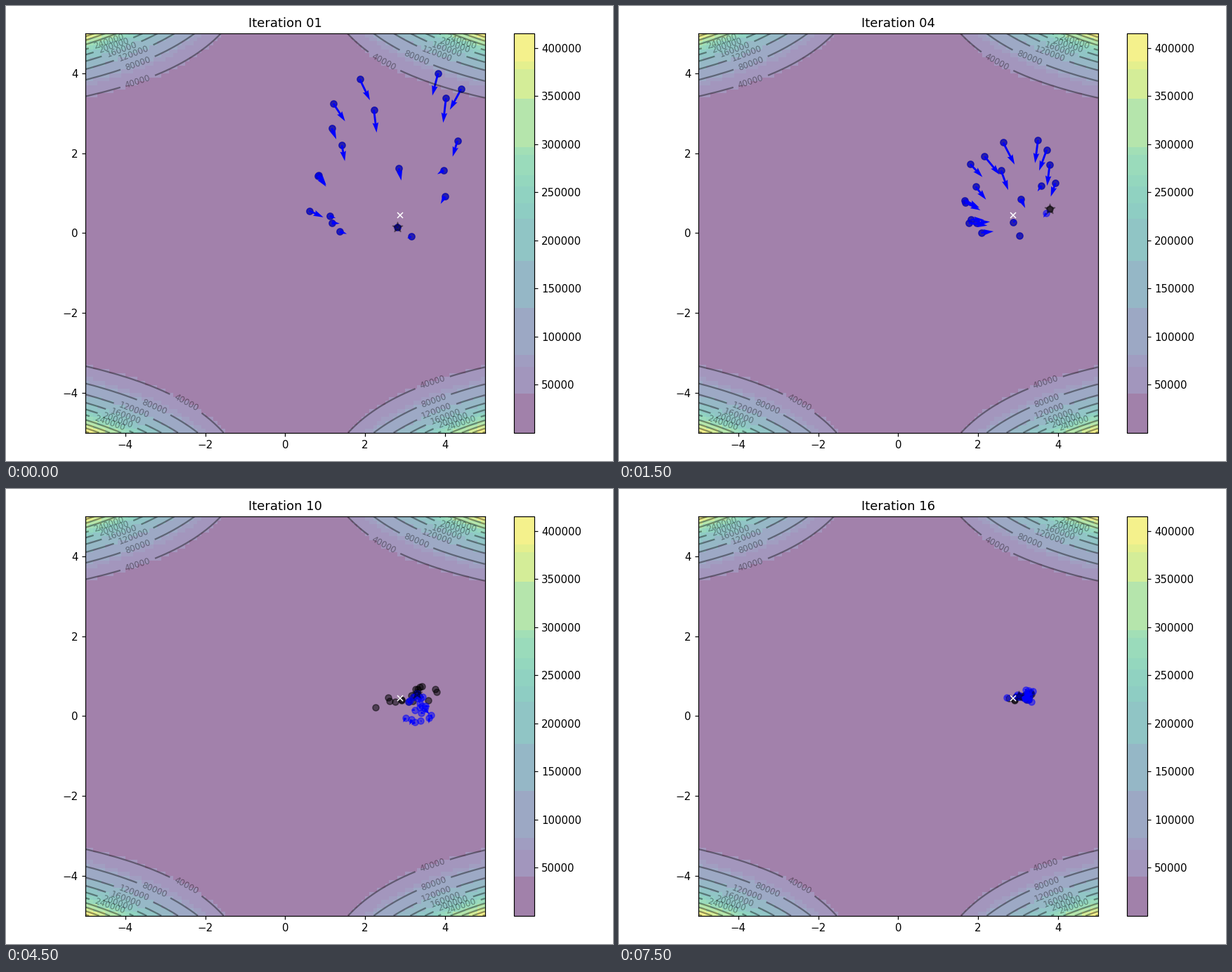
Write a matplotlib script that moves like this. It is 864x648 px and loops after 8000 ms.

```python
import numpy as np
import matplotlib.pyplot as plt
from matplotlib.animation import FuncAnimation
from matplotlib.colors import ListedColormap

WIDTH, HEIGHT, DPI = 864, 648, 108
STEPS = 16
N = 20
C1 = C2 = 0.1
W = 0.8


def f(x, y):
    """Beale function."""
    return ((1.5 - x + x * y) ** 2
            + (2.25 - x + x * y ** 2) ** 2
            + (2.625 - x + x * y ** 3) ** 2)


def simulate(updates):
    """Run the swarm; return (X, V, pbest, gbest) after every update."""
    np.random.seed(100)
    X = np.random.rand(2, N) * 5
    V = np.random.randn(2, N) * 0.1
    pbest, pbest_obj = X.copy(), f(*X)
    gbest = pbest[:, pbest_obj.argmin()]
    states = []
    for _ in range(updates):
        r1, r2 = np.random.rand(2)
        V = W * V + C1 * r1 * (pbest - X) + C2 * r2 * (gbest[:, None] - X)
        X = X + V
        obj = f(*X)
        better = pbest_obj >= obj
        pbest = np.where(better, X, pbest)
        pbest_obj = np.minimum(pbest_obj, obj)
        gbest = pbest[:, pbest_obj.argmin()]
        states.append((X, V, pbest, gbest))
    return states


def banded_viridis():
    """Viridis reduced to a few flat bands."""
    edges = np.array([0.095, 0.163, 0.195, 0.313, 0.43, 0.534, 0.575,
                      0.619, 0.647, 0.696, 0.717, 0.837, 0.91, 0.931])
    bounds = np.concatenate([[0], edges, [1]])
    mids = (bounds[:-1] + bounds[1:]) / 2
    mids[0] = 0.01
    band = np.digitize(np.linspace(0, 1, 256), edges)
    return ListedColormap(plt.get_cmap("viridis")(mids)[band])


def place(axes, left, bottom, width, height):
    """Position axes in pixels of the final picture."""
    axes.set_position([left / WIDTH, bottom / HEIGHT,
                       width / WIDTH, height / HEIGHT])


# The first update is a warm-up that is never shown.
states = simulate(STEPS + 1)[1:]

axis = np.linspace(-5, 5, 100)
x, y = np.meshgrid(axis, axis)
z = f(x, y)
best = z.argmin()

# Contour labels are laid out at 100 dpi, before the final resolution is set.
fig, ax = plt.subplots(figsize=(WIDTH / DPI, HEIGHT / DPI), dpi=100)
img = ax.imshow(z, extent=[-5, 5, -5, 5], origin="lower",
                cmap=banded_viridis(), alpha=0.5, interpolation="nearest")
bar = fig.colorbar(img, ax=ax)
ax.plot([x.ravel()[best]], [y.ravel()[best]], marker="x", markersize=5,
        color="white")
contours = ax.contour(x, y, z, 10, colors="black", alpha=0.4)
ax.clabel(contours, inline=True, fontsize=8, fmt="%.0f")

fig.set_dpi(DPI)
side = 568.8
place(ax, 112.9, 40.2, side, side)
place(bar.ax, 723.2, 40.2, side / 20, side)

X, V, pbest, gbest = states[0]
pbest_plot = ax.scatter(*pbest, marker="o", color="black", alpha=0.5)
p_plot = ax.scatter(*X, marker="o", color="blue", alpha=0.5)
p_arrow = ax.quiver(*X, *V, color="blue", width=0.005, angles="xy",
                    scale_units="xy", scale=1)
gbest_plot = ax.scatter(*gbest, marker="*", s=100, color="black", alpha=0.4)
ax.set_xlim(-5, 5)
ax.set_ylim(-5, 5)


def animate(i):
    X, V, pbest, gbest = states[i]
    ax.set_title(f"Iteration {i + 1:02d}")
    pbest_plot.set_offsets(pbest.T)
    p_plot.set_offsets(X.T)
    p_arrow.set_offsets(X.T)
    p_arrow.set_UVC(*V)
    gbest_plot.set_offsets(gbest[None])
    return pbest_plot, p_plot, p_arrow, gbest_plot


anim = FuncAnimation(fig, animate, frames=STEPS, interval=500,
                     blit=False, repeat=True, repeat_delay=0)
plt.show()
```
